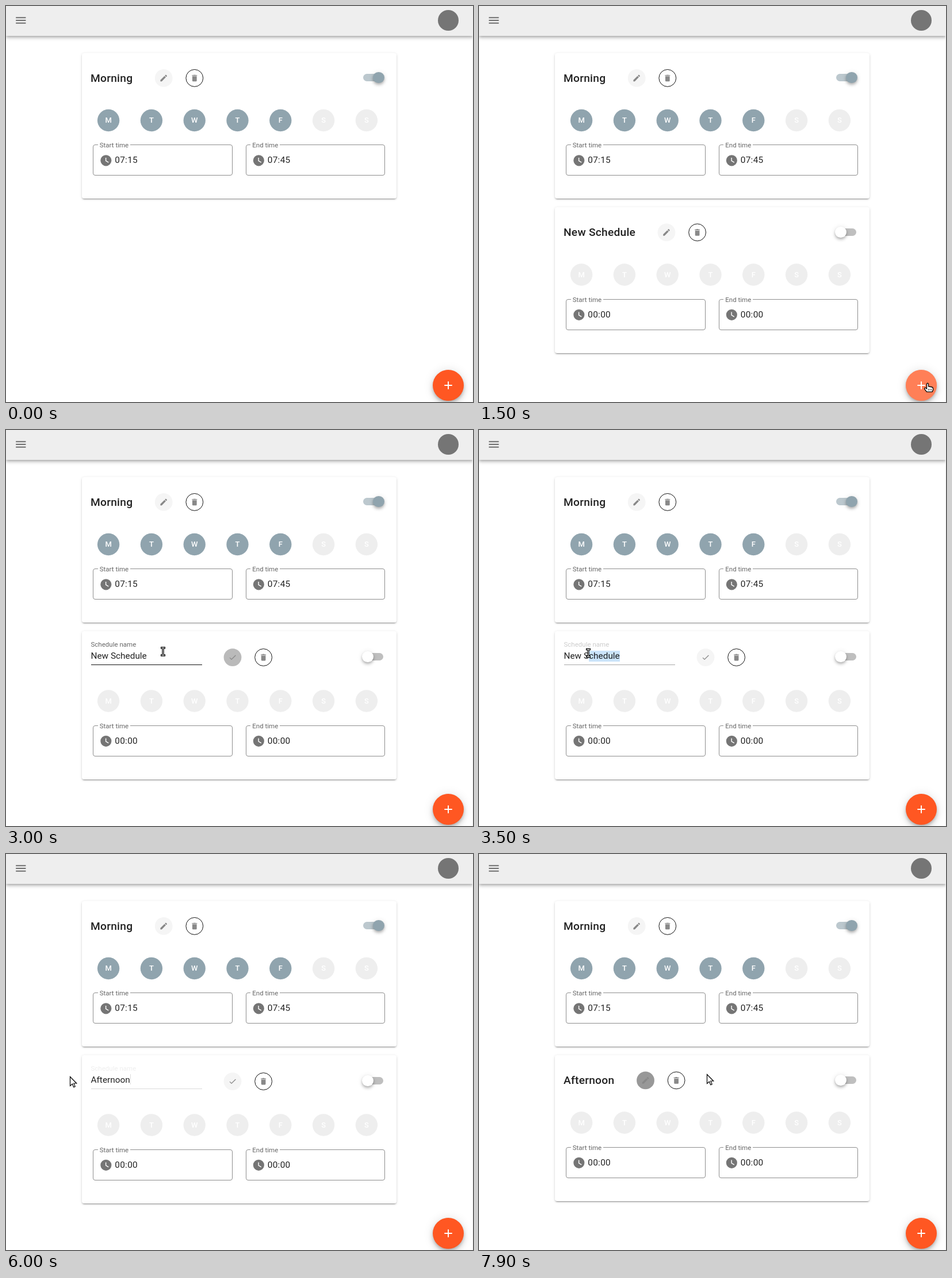
These frames come from a looping animation (812x689 px, 8 s). An HTML page:

```html
<!DOCTYPE html>
<html lang="en">
<head>
<meta charset="utf-8">
<title>Schedules</title>
<style>
  html, body { margin: 0; width: 100%; height: 100%; overflow: hidden; background: #fff; }
  #stage { position: relative; width: 812px; height: 689px; overflow: hidden; font-family: Roboto, sans-serif; color: rgba(0,0,0,.87); }
  #stage div, #stage svg { position: absolute; box-sizing: border-box; }
  .layer { left: 0; top: 0; }
  .text { line-height: 20px; white-space: pre; }
  .header { left: 0; top: 0; width: 812px; height: 52px; background: #eee;
    box-shadow: 0 2px 4px -1px rgba(0,0,0,.2), 0 4px 5px rgba(0,0,0,.14), 0 1px 10px rgba(0,0,0,.12); }
  .edge { right: 0; top: 0; width: 1px; height: 689px; background: #f0f0f0; }
  .card { left: 132px; width: 547px; border-radius: 4px; background: #fff;
    box-shadow: 0 3px 1px -2px rgba(0,0,0,.2), 0 2px 2px rgba(0,0,0,.14), 0 1px 5px rgba(0,0,0,.12); }
  .round { border-radius: 50%; }
  .fab { box-shadow: 0 3px 5px -1px rgba(0,0,0,.2), 0 6px 10px rgba(0,0,0,.14), 0 1px 18px rgba(0,0,0,.12); }
  .thumb { box-shadow: 0 2px 4px -1px rgba(0,0,0,.2), 0 4px 5px rgba(0,0,0,.14), 0 1px 10px rgba(0,0,0,.12); }
  .track { width: 34.6px; height: 13.4px; left: 621px; border-radius: 7px; }
  .field { width: 242.5px; height: 54px; border: 1px solid #8e8e8e; border-radius: 4px; }
  .label { background: #fff; padding: 0 3px; color: rgba(0,0,0,.6); }
  .title { font-weight: 500; letter-spacing: .24px; }
  .day { width: 20px; text-align: center; font-weight: 500; color: #fff; }
  .caret { display: inline-block; width: 1px; height: 18px; margin-right: -1px; vertical-align: -3px; background: #ddd; }
  .selection { display: inline-block; line-height: 19px; }
</style>
</head>
<body>
<div id="stage"></div>
<script>
const LOOP = 8000, STEP = 100;
const TITLE = 19.2, BODY = 15.36, SMALL = 11.52;
const stage = document.getElementById('stage');

const ICONS = {
  menu: 'M3 6H21V8H3ZM3 11H21V13H3ZM3 16H21V18H3Z',
  pencil: 'M20.7 7C21.1 6.6 21.1 6 20.7 5.6L18.4 3.3C18 2.9 17.3 2.9 17 3.3L15.1 5.1 18.9 8.9M3 17.25V21H6.75L17.8 9.9 14.1 6.2Z',
  trash: 'M19 4H15.5L14.5 3H9.5L8.5 4H5V6H19M6 19A2 2 0 0 0 8 21H16A2 2 0 0 0 18 19V7H6Z',
  check: 'M21 7L9 19 3.5 13.5 4.9 12.1 9 16.2 19.6 5.6Z',
  plus: 'M19 13H13V19H11V13H5V11H11V5H13V11H19Z',
  clock: 'M12 2A10 10 0 0 0 12 22A10 10 0 0 0 12 2M16.2 16.2L11 13V7H12.5V12.2L17 14.9Z'
};
const POINTERS = {
  arrow: '<path d="M.5 .5V16.5L4.3 13 6.8 18.7 9.2 17.6 6.8 12H11.7Z" fill="#fff" stroke="#000" stroke-width="1.2"/>',
  hand: '<path d="M-1.5 1.5Q0-1 1.5 1.5V6L7.5 7Q9.5 7.5 9.5 9.5V12L8 15.3H-1.5L-5.3 10.5Q-6 7.8-3.5 8.5L-1.5 10Z" fill="#fff" stroke="#000" stroke-width="1.3"/><path d="M1.5 10V13M4 10V13M6.5 10V13" stroke="#000" stroke-width=".8"/>',
  beam: '<g fill="none"><path d="M-4-6.5H4M0-7V7M-4 6.5H4" stroke="#000" stroke-width="3.4"/><path d="M-3-6.5H3M0-6V6M-3 6.5H3" stroke="#fff"/></g>'
};

// time, x, y, and the pointer shape from that time on
const POINTER_PATH = [
  [300, 781, 684, 'hand'], [400, 780, 668, 'hand'], [500, 780, 658, 'hand'], [600, 780, 656, 'hand'],
  [1500, 780, 656, 'hand'], [1600, 722, 606, 'arrow'], [1700, 648, 547, 'arrow'], [1800, 540, 500, 'arrow'],
  [2000, 380, 420, 'arrow'], [2200, 335, 396, 'hand'], [2300, 332, 394, 'hand'],
  [2800, 332, 394, 'beam'], [2900, 295, 388, 'beam'], [3000, 273, 385.5, 'beam'],
  [3200, 273, 385.5, 'beam'], [3500, 190, 388, 'beam'], [3700, 111, 387, 'arrow'],
  [6800, 111, 387, 'arrow'], [6900, 128, 386, 'arrow'], [7000, 200, 380, 'beam'], [7100, 300, 373, 'beam'],
  [7200, 385, 371, 'arrow'], [7300, 398, 377, 'arrow'], [7400, 396, 383, 'hand'], [7800, 396, 383, 'arrow']
];
const FAB_GLOW = [[300, 0], [500, .08], [800, .08], [1000, .35], [1100, .42], [1200, .42], [1500, .24], [2500, .24], [2900, 0]];
const EDIT_SHADE = [[2100, 0], [2200, .04], [2500, .04], [2700, .38], [2800, .38], [3000, .24], [3200, .24], [3500, 0],
  [7500, 0], [7600, .18], [7700, .36], [7800, .38]];
const FOCUS = [[3200, 0], [3600, 1]];
const KEY_TIMES = [4500, 4700, 4900, 5000, 5200, 5400, 5700, 5800, 6000];

function ramp(keys, t, column = 1) {
  const next = keys.findIndex(k => k[0] > t);
  if (next === 0) return keys[0][column];
  if (next < 0) return keys[keys.length - 1][column];
  const a = keys[next - 1], b = keys[next];
  return a[column] + (b[column] - a[column]) * (t - a[0]) / (b[0] - a[0]);
}

const box = (cls, css, inner = '') => `<div class="${cls}" style="${css}">${inner}</div>`;
const text = (x, y, size, str, cls = '', css = '') =>
  box('text ' + cls, `left:${x}px;top:${y - 10}px;font-size:${size}px;${css}`, str);
const knob = (x, y, r, color, cls) =>
  box('round ' + cls, `left:${x - r}px;top:${y - r}px;width:${2 * r}px;height:${2 * r}px;background:${color}`);

// Shapes on full-stage layers keep their sub-pixel positions.
const layer = inner => `<svg class="layer" width="812" height="689">${inner}</svg>`;
const disc = (x, y, r, fill, stroke = 'none') =>
  layer(`<circle cx="${x}" cy="${y}" r="${r}" fill="${fill}" stroke="${stroke}"/>`);
const icon = (name, x, y, size, color) =>
  layer(`<path transform="translate(${x} ${y}) scale(${size / 24}) translate(-12 -12)" d="${ICONS[name]}" fill="${color}" fill-rule="evenodd"/>`);

function actions(x, trashX, y, name, shade) {
  return disc(x, y, 15.4, '#f5f5f5')
    + disc(x, y, 15.4, `rgba(0,0,0,${shade})`)
    + icon(name, x, y, 15.4, '#888')
    + disc(trashX, y, 14.9, 'none', '#111')
    + icon('trash', trashX, y, 15.4, '#888');
}

function toggle(y, on) {
  return box('track', `top:${y - 6.7}px;background:${on ? '#bcc8ce' : '#bfbfbf'}`)
    + knob(on ? 648 : 629, y, 9.6, on ? '#90a4ae' : '#fff', 'thumb');
}

function timeField(x, y, label, time) {
  return box('field', `left:${x}px;top:${y}px`)
    + text(x + 8.5, y + 1.1, SMALL, label, 'label')
    + icon('clock', x + 22.6, y + 27.5, 23, '#757575')
    + text(x + 38, y + 27.1, BODY, time, '', 'letter-spacing:.3px');
}

function card(y, extra, heading, activeDays, start, end) {
  const dayY = y + extra + 117.3, fieldY = y + extra + 159.6;
  const days = [...'MTWTFSS'].map((day, i) => {
    const x = 178.1 + 74.8 * i;
    return disc(x, dayY, 19.2, i < activeDays ? '#90a4ae' : '#eee') + text(x - 10, dayY, 13, day, 'day');
  }).join('');
  return box('card', `top:${y}px;height:${253.5 + extra}px`)
    + heading + toggle(y + 43 + extra * .4, activeDays > 0) + days
    + timeField(151.25, fieldY, 'Start time', start)
    + timeField(416.75, fieldY, 'End time', end);
}

const title = (str, y, x, shade) =>
  text(147, y + 44, TITLE, str, 'title') + actions(x, x + 53.6, y + 43.7, 'pencil', shade);

function nameEditor(t, pointerX) {
  const focus = ramp(FOCUS, t);
  const grey = (a, b) => { const v = Math.round(a + (b - a) * focus); return `rgb(${v},${v},${v})`; };
  const typed = KEY_TIMES.filter(k => k <= t).length;
  const caretOn = typed && (t < 6600 || (t >= 7100 && t < 7600));
  let value = 'Afternoon'.slice(0, typed);
  if (!typed) {
    const from = t < 3300 ? 400 : Math.max(0, pointerX - 147.5);
    value = `<span class="selection" style="background:linear-gradient(90deg,transparent ${from}px,#cbe4fa ${from}px)">New Schedule</span>`;
  }
  return text(147.5, 373, SMALL, 'Schedule name', '', `color:${grey(102, 238)}`)
    + text(147.5, 393, BODY, value + (caretOn ? '<span class="caret"></span>' : ''))
    + box('', `left:147.5px;top:408px;width:193px;height:1px;background:${grey(17, 218)}`)
    + actions(394, 447.6, 395.6, 'check', ramp(EDIT_SHADE, t));
}

function pointer(t, x, y) {
  const shape = POINTER_PATH.filter(k => k[0] <= t).pop()[3];
  return layer(`<g transform="translate(${x} ${y})">${POINTERS[shape]}</g>`);
}

function view(t) {
  const x = ramp(POINTER_PATH, t, 1), y = ramp(POINTER_PATH, t, 2);
  const editing = t >= 2800 && t < 7800;
  const first = 81.7, second = 350.2;
  let html = box('header', '') + icon('menu', 25.8, 25, 23, '#6f6f6f') + disc(769, 25, 18, '#757575')
    + card(first, 0, title('Morning', first, 274.2, 0), 5, '07:15', '07:45');
  if (t >= 1300) {
    const shade = ramp(EDIT_SHADE, t);
    const heading = editing ? nameEditor(t, x)
      : t < 2800 ? title('New Schedule', second, 326, shade) : title('Afternoon', second, 289.5, shade);
    html += card(second, editing ? 4 : 0, heading, 0, '00:00', '00:00');
  }
  html += box('edge', '')
    + knob(769, 660, 27, '#ff5722', 'fab')
    + disc(769, 660, 27, `rgba(255,255,255,${ramp(FAB_GLOW, t)})`)
    + icon('plus', 769, 660, 23, '#fff');
  return t < 300 ? html : html + pointer(t, x, y);
}

let shown = -1;
function tick() {
  const t = Math.floor(performance.now() % LOOP / STEP) * STEP;
  if (t !== shown) stage.innerHTML = view(shown = t);
  requestAnimationFrame(tick);
}
tick();
</script>
</body>
</html>
```
